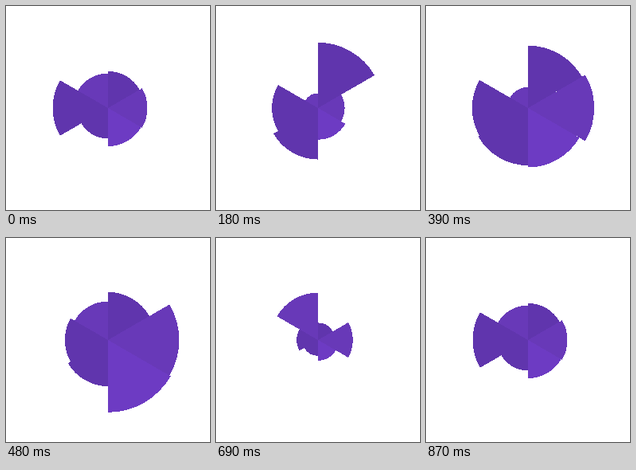
An HTML page that plays this animation: 256 px wide and 256 px high, repeating every 0.9 s.

```html
<!DOCTYPE html>
<html lang="en">
<head>
<meta charset="utf-8">
<title>Pulsing fan</title>
<style>
  html, body { margin: 0; width: 100%; height: 100%; overflow: hidden; background: #fff; }
  svg { display: block; width: 256px; height: 256px; }
</style>
</head>
<body>
<svg id="stage" viewBox="-128 -128 256 256" shape-rendering="crispEdges"></svg>
<script>
const LOOP = 900, STEP = 30, PERIOD = LOOP - STEP;
const DARK = '#6035ad', MID = '#6839b8', LIGHT = '#6d3bc3';

// Clockwise from the top: colour and radii at evenly spaced moments of the period
const wedges = [
  [DARK,  [46, 77, 90, 70, 37, 21]],
  [MID,   [49.5, 33.5, 45, 93.5, 62, 41]],
  [LIGHT, [48, 43, 34, 88.5, 75, 17]],
  [DARK,  [38.5, 60, 75, 67, 34, 19]],
  [DARK,  [69.5, 56, 70, 65.5, 25.5, 31.5]],
  [MID,   [43.5, 24, 6, 37.5, 68, 55.5]]
].map(([fill, radii], i) => {
  const path = document.createElementNS('http://www.w3.org/2000/svg', 'path');
  path.setAttribute('fill', fill);
  path.setAttribute('transform', `rotate(${i * 60})`);
  document.getElementById('stage').append(path);
  return { path, radii };
});

// Closed Catmull-Rom curve, phase from 0 to 1
function curve(points, phase) {
  const n = points.length, i = Math.floor(phase * n), u = phase * n - i;
  const [a, b, c, d] = [-1, 0, 1, 2].map(k => points[(i + k + n) % n]);
  return b + u / 2 * (c - a + u * (2 * a - 5 * b + 4 * c - d + u * (3 * (b - c) + d - a)));
}

// 60 degree slice starting at twelve o'clock
function slice(r) {
  const x = r * Math.sin(Math.PI / 3), y = -r / 2;
  return `M0 0V${-r}A${r} ${r} 0 0 1 ${x} ${y}Z`;
}

function tick() {
  const t = Math.floor(performance.now() % LOOP / STEP) * STEP;
  const phase = t % PERIOD / PERIOD;
  for (const { path, radii } of wedges) path.setAttribute('d', slice(curve(radii, phase)));
  requestAnimationFrame(tick);
}
tick();
</script>
</body>
</html>
```
